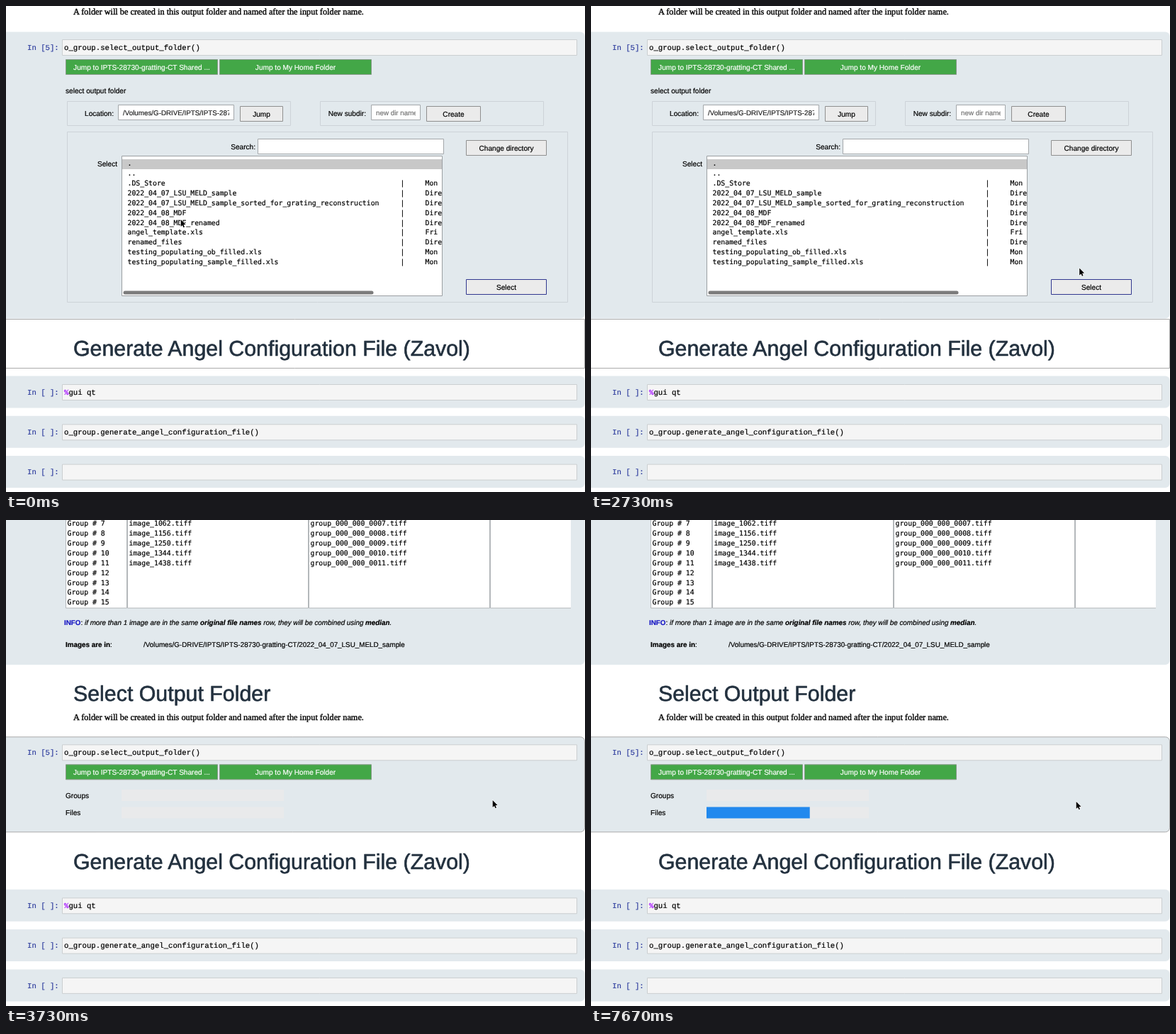
Recreate the animation shown at these times as an HTML page with a canvas. Size 817x685 px, loop 8000 ms.

```html
<!DOCTYPE html>
<html lang="en">
<head>
<meta charset="utf-8">
<title>Notebook output folder</title>
<style>
  html, body { margin: 0; width: 100%; height: 100%; overflow: hidden; background: #fff; }
  canvas { display: block; width: 817px; height: 685px; }
</style>
</head>
<body>
<canvas id="stage"></canvas>
<script>
const W = 817, H = 685, LOOP = 8000, TICK = 1000 / 15;
const canvas = document.getElementById('stage');
const ctx = canvas.getContext('2d');
const dpr = window.devicePixelRatio || 1;
canvas.width = Math.round(W * dpr);
canvas.height = Math.round(H * dpr);

const SANS = '"Liberation Sans", Arial, sans-serif';
const SERIF = '"Liberation Serif", Georgia, serif';
const CODE = '"Liberation Mono", "Courier New", monospace';
const LIST = '"DejaVu Sans Mono", Menlo, monospace';
const PANEL = '#e2e9ed', LINE = '#cdd3d8', EDGE = '#ababab';

// Pointer path: time, x, y
const path = [
  [0, 247, 301], [200, 261, 328], [733, 261, 328], [1133, 566, 292],
  [1600, 566, 292], [1933, 681, 187], [2467, 692, 344], [3000, 687, 395],
  [4595, 687, 395], [4600, 686, 396], [5325, 686, 396], [5330, 685, 397]
];
// Moments at which one more file is finished
const fileTimes = [4665, 5195, 5725, 6325, 6795, 7195, 7665];

const files = [
  ['.', ''], ['..', ''], ['.DS_Store', 'Mon'],
  ['2022_04_07_LSU_MELD_sample', 'Directory'],
  ['2022_04_07_LSU_MELD_sample_sorted_for_grating_reconstruction', 'Directory'],
  ['2022_04_08_MDF', 'Directory'], ['2022_04_08_MDF_renamed', 'Directory'],
  ['angel_template.xls', 'Fri'], ['renamed_files', 'Directory'],
  ['testing_populating_ob_filled.xls', 'Mon'],
  ['testing_populating_sample_filled.xls', 'Mon']
];

// y is the middle of the capitals; a hairline outline gives the soft, heavier strokes
function text(str, x, y, size, family = SANS, color = '#000', align = 'left', style = '') {
  ctx.font = `${style} ${size}px ${family}`;
  ctx.fillStyle = ctx.strokeStyle = color;
  ctx.textAlign = align;
  ctx.lineJoin = 'round';
  ctx.lineWidth = size * (family === SERIF ? 0.03 : 0.02);
  ctx.fillText(str, x, y + size * 0.35);
  ctx.strokeText(str, x, y + size * 0.35);
  return ctx.measureText(str).width;
}

const label = (str, x, y, align) => text(str, x, y, 10.1, SANS, '#000', align);

function box(x, y, w, h, fill, stroke, r = 0, weight = 1) {
  ctx.beginPath();
  ctx.roundRect(x + 0.5, y + 0.5, w - 1, h - 1, r);
  if (fill) { ctx.fillStyle = fill; ctx.fill(); }
  if (stroke) { ctx.strokeStyle = stroke; ctx.lineWidth = weight; ctx.stroke(); }
}

function clipped(x, y, w, h, draw) {
  ctx.save();
  ctx.beginPath();
  ctx.rect(x, y, w, h);
  ctx.clip();
  draw();
  ctx.restore();
}

function button(str, x, y, w, h, { edge = '#8f8f8f', weight = 1, hover = false } = {}) {
  if (hover) {
    ctx.save();
    ctx.shadowColor = 'rgba(0,0,0,.4)';
    ctx.shadowBlur = 4 * dpr;
    ctx.shadowOffsetY = 2 * dpr;
    box(x, y, w, h, '#eee');
    ctx.restore();
  }
  box(x, y, w, h, '#ebebeb', edge, 0, weight);
  label(str, x + w / 2, y + h / 2, 'center');
}

function greenButton(str, x, y, w) {
  box(x, y, w, 22, '#43a747', '#869a88');
  text(str, x + w / 2, y + 11, 10.1, SANS, '#fff', 'center');
}

function heading(str, y) {
  text(str, 95, y, 30.35, SANS, '#22303e');
}

function note(y) {
  text('A folder will be created in this output folder and named after the input folder name.',
    95, y, 12.29, SERIF);
}

function codeLine(prompt, y) {
  text(`In [${prompt}]:`, 30, y, 10.67, CODE, '#303f9f');
  box(79, y - 11, 727, 23, '#f5f5f5', '#cbcfd1');
}

function codeCell(y) {
  box(-10, y - 23, 827, 46, PANEL, null, 6);
  codeLine(' ', y);
}

// Cell 5 always ends at the same height and grows upwards
function folderCell(top, selected) {
  box(-10, top, 827, 441 - top, PANEL, selected ? EDGE : null, 6);
  codeLine('5', top + 22);
  text('o_group.select_output_folder()', 82, top + 22, 10.67, CODE);
  greenButton('Jump to IPTS-28730-gratting-CT Shared ...', 84, top + 39, 215);
  greenButton('Jump to My Home Folder', 301, top + 39, 215);
}

function lowerCells() {
  heading('Generate Angel Configuration File (Zavol)', 482);
  [544, 600.3, 656.6].forEach(codeCell);
  const w = text('%', 82, 544, 10.67, CODE, '#a2f', 'left', 'bold');
  text('gui qt', 82 + w, 544, 10.67, CODE);
  text('o_group.generate_angel_configuration_file()', 82, 600.3, 10.67, CODE);
}

function fileList() {
  box(163, 211, 453, 198, '#fff', '#9b9fa2');
  ctx.fillStyle = '#c8c8c8';
  ctx.fillRect(164, 216, 451, 14);
  clipped(164, 212, 451, 196, () => files.forEach(([name, info], i) => {
    const y = 222 + i * 13.85;
    text(name, 171.5, y, 9.83, LIST);
    if (info) {
      text('|', 556.5, y, 9.83, LIST);
      text(info, 591.5, y, 9.83, LIST);
    }
  }));
  box(165, 401, 354, 6, '#7c7c7c', null, 2.5);
}

function browser(t, p) {
  const over = y => p.x > 648 && p.x < 763 && p.y > y - 3 && p.y < y + 22;
  const pressed = t > 3325;
  label('select output folder', 84, 119);

  box(86, 134, 316, 35, null, LINE);
  label('Location:', 152, 151, 'right');
  box(158, 139, 164, 22, '#fff', '#a3a7aa');
  clipped(160, 140, 155, 20, () => text('/Volumes/G-DRIVE/IPTS/IPTS-28730', 165, 150.5, 9.8, SANS, '#222'));
  button('Jump', 330, 141, 61, 22);

  box(443, 134, 316, 35, null, LINE);
  label('New subdir:', 508, 151, 'right');
  box(515, 139, 70, 22, '#fff', '#a3a7aa');
  clipped(517, 140, 61, 20, () => text('new dir name', 522, 150.5, 9.8, SANS, '#757575'));
  button('Create', 593, 141, 77, 22);

  box(86, 177, 707, 241, null, LINE);
  label('Search:', 352, 198, 'right');
  box(355, 187, 263, 22, '#fff', '#a3a7aa');
  label('Select', 157, 222, 'right');
  fileList();
  button('Change directory', 649, 189, 114, 22, { hover: over(189) });
  button('Select', 649, 385, 114, 22, {
    edge: pressed ? '#2a56b8' : '#31388f',
    weight: pressed ? 2 : 1,
    hover: over(385) && !pressed
  });
}

function infoLine(y) {
  let x = 82;
  [
    ['INFO', 'bold', '#1a1ac4'], [':', ''],
    [' if more than 1 image are in the same ', 'italic'],
    ['original file names', 'italic bold'],
    [' row, they will be combined using ', 'italic'],
    ['median', 'italic bold'], ['.', 'italic']
  ].forEach(([str, style, color = '#000']) => {
    x += text(str, x, y, 9.86, SANS, color, 'left', style);
  });
}

function groupTable() {
  box(-10, -120, 827, 382, PANEL, null, 6);
  clipped(84, -100, 713, 283, () => {
    [[84, 87], [171, 256], [427, 256], [683, 150]].forEach(([x, w]) =>
      box(x, -60, w, 242, '#fff', '#b4b8bb'));
    const pad = n => String(n).padStart(4, '0');
    for (let k = 1; k <= 15; k++) {
      const y = 7 + (k - 3) * 13.85;
      text('Group # ' + k, 86.5, y, 9.83, LIST);
      if (k < 12) {
        text(`image_${pad(686 + 94 * (k - 3))}.tiff`, 173.5, y, 9.83, LIST);
        text(`group_000_000_${pad(k)}.tiff`, 429.5, y, 9.83, LIST);
      }
    }
  });
  infoLine(202);
  const w = text('Images are in', 84, 233, 9.88, SANS, '#000', 'left', 'bold');
  text(':', 84 + w, 233, 9.88);
  text('/Volumes/G-DRIVE/IPTS/IPTS-28730-gratting-CT/2022_04_07_LSU_MELD_sample', 194, 233, 9.85);
  heading('Select Output Folder', 302);
  note(334.7);
}

function progress(t) {
  label('Groups', 84, 388.5);
  label('Files', 84, 412.5);
  ctx.fillStyle = '#e9eaeb';
  ctx.fillRect(163, 380, 229, 16);
  ctx.fillRect(163, 404.5, 229, 16);
  const done = fileTimes.filter(at => t >= at).length;
  ctx.fillStyle = '#2189ee';
  ctx.fillRect(163, 404.5, 229 * done / 11, 16);
}

function pointerAt(t) {
  let i = 1;
  while (i < path.length - 1 && path[i][0] < t) i++;
  const [t0, x0, y0] = path[i - 1], [t1, x1, y1] = path[i];
  const k = Math.min(1, Math.max(0, (t - t0) / (t1 - t0)));
  return { x: x0 + (x1 - x0) * k, y: y0 + (y1 - y0) * k };
}

function arrow({ x, y }) {
  const pts = [[0, 0], [0, 10], [2.3, 7.9], [3.8, 11.3], [5.3, 10.6], [3.9, 7.3], [6.9, 7.1]];
  ctx.beginPath();
  pts.forEach(([dx, dy]) => ctx.lineTo(x - 0.3 + dx, y + dy));
  ctx.closePath();
  ctx.lineJoin = 'round';
  ctx.strokeStyle = '#fff';
  ctx.lineWidth = 1.2;
  ctx.stroke();
  ctx.fillStyle = '#000';
  ctx.fill();
}

function textPointer(x, y) {
  ctx.beginPath();
  ctx.moveTo(x - 2.5, y - 5);
  ctx.quadraticCurveTo(x, y - 5, x, y - 3.5);
  ctx.lineTo(x, y + 3.5);
  ctx.quadraticCurveTo(x, y + 5, x - 2.5, y + 5);
  ctx.moveTo(x + 2.5, y - 5);
  ctx.quadraticCurveTo(x, y - 5, x, y - 3.5);
  ctx.moveTo(x, y + 3.5);
  ctx.quadraticCurveTo(x, y + 5, x + 2.5, y + 5);
  ctx.strokeStyle = '#222';
  ctx.lineWidth = 1;
  ctx.stroke();
}

function draw(t) {
  ctx.setTransform(dpr, 0, 0, dpr, 0, 0);
  ctx.textRendering = 'geometricPrecision';
  ctx.fillStyle = '#fff';
  ctx.fillRect(0, 0, W, H);
  const p = pointerAt(t);

  if (t < 3525) {
    const selected = t > 3460;
    note(8);
    folderCell(36, selected);
    if (!selected) box(-10, 441, 827, 70, '#fff', EDGE);
    browser(t, p);
    lowerCells();
    arrow(p);
    return;
  }

  const running = t > 3725;
  ctx.save();
  ctx.translate(0, running ? -57.4 : 0);
  groupTable();
  ctx.restore();

  // The page settles a fraction higher once the progress bars appear
  ctx.save();
  ctx.translate(0, running ? -0.7 : 0);
  folderCell(running ? 306 : 363, true);
  lowerCells();
  ctx.restore();
  if (running) {
    progress(t);
    arrow(p);
  } else {
    textPointer(687.5, 396);
  }
}

const start = performance.now();
function loop() {
  const t = (performance.now() - start) % LOOP;
  draw(Math.floor((t + 5) / TICK) * TICK);
  requestAnimationFrame(loop);
}
loop();
</script>
</body>
</html>
```
